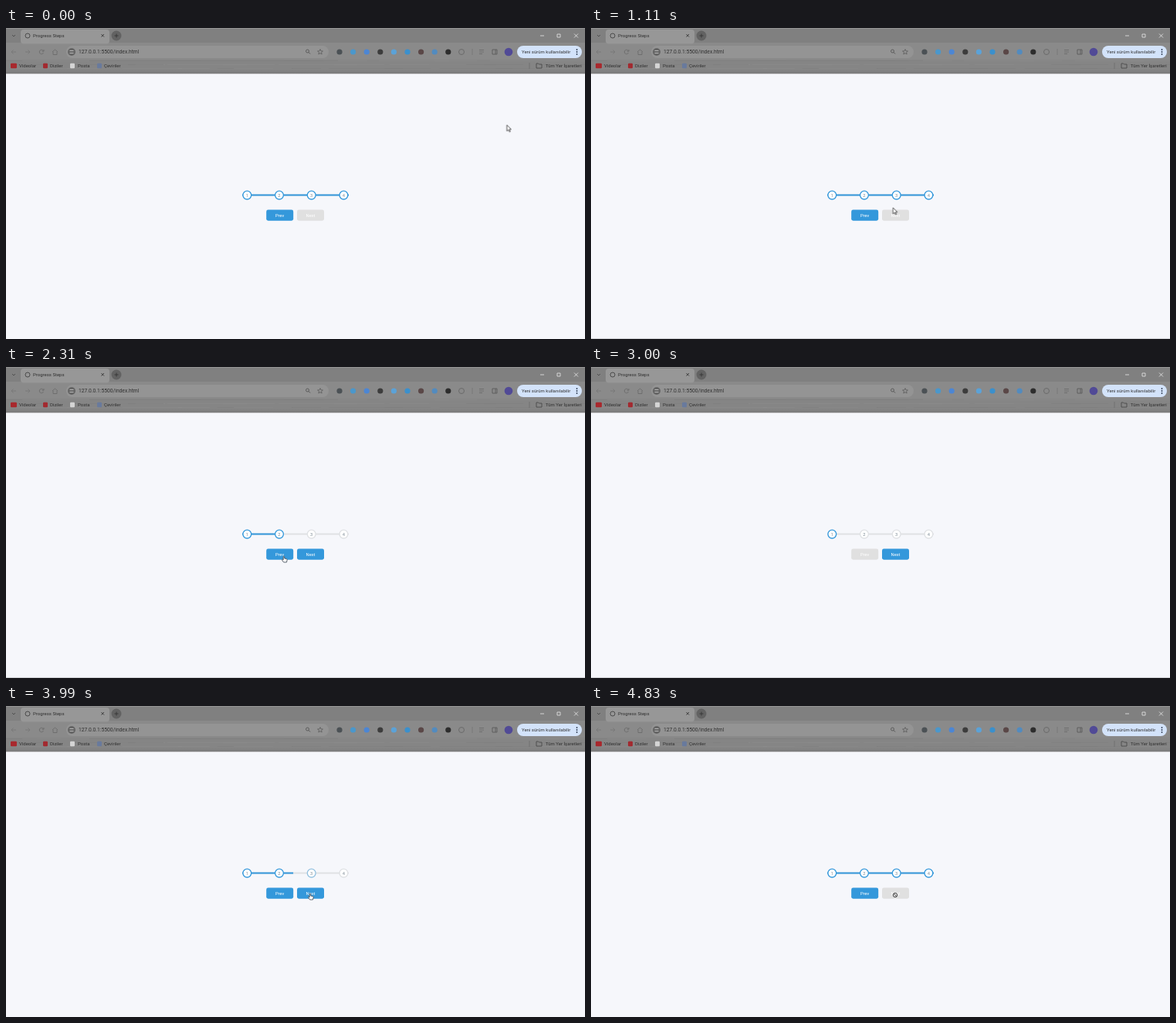
Recreate the animation shown at these times as an HTML page. Size 750 by 403 pixels, loop 4860 ms.

```html
<!DOCTYPE html>
<html lang="tr">
<head>
<meta charset="utf-8">
<title>Progress Steps</title>
<style>
  html, body { margin: 0; width: 100%; height: 100%; overflow: hidden; background: #f6f7fb; }
  svg { display: block; width: 750px; height: 403px; overflow: hidden; }
  #scene { filter: blur(.45px); }
  text { font-family: Roboto, Arial, sans-serif; font-size: 6px; fill: #303030; }
  .url { font-size: 6.7px; }
  .mid { text-anchor: middle; }
  .num { font-size: 5.8px; fill: #7d8a95; }
  .bar { transform-box: fill-box; transform-origin: left; }
  .btn { transform-box: fill-box; transform-origin: center; }
  .btn text { font-size: 5.8px; fill: #fff; }
</style>
</head>
<body>
<svg viewBox="0 0 750 403">
  <defs>
    <linearGradient id="strip" x2="0" y2="1">
      <stop offset="0" stop-color="#858585"/>
      <stop offset=".7" stop-color="#858585"/>
      <stop offset="1" stop-color="#7b7b7b"/>
    </linearGradient>
  </defs>
  <g id="scene"></g>
</svg>
<script>
const LOOP = 4860, EASE = 400;
const BLUE = '#3498db', GREY = '#dfe1e4', OFF = '#e0e0e0';
const scene = document.getElementById('scene');

function add(tag, attrs, parent = scene, content = '') {
  const el = document.createElementNS('http://www.w3.org/2000/svg', tag);
  for (const key in attrs) el.setAttribute(key, attrs[key]);
  el.textContent = content;
  parent.appendChild(el);
  return el;
}
const rect = (x, y, width, height, fill, rx = 0, parent) =>
  add('rect', { x, y, width, height, fill, rx }, parent);
// Full-width bands overshoot the stage so that their ends stay sharp
const band = (y, height, fill) => rect(-5, y, 760, height, fill);
const dot = (cx, cy, r, fill) => add('circle', { cx, cy, r, fill });
const ring = (cx, cy, r, stroke, width = 1) =>
  add('circle', { cx, cy, r, fill: 'none', stroke, 'stroke-width': width });
const line = (d, stroke = '#4a4a4a', width = .9) =>
  add('path', { d, stroke, 'stroke-width': width, fill: 'none' });
const label = (x, y, content, attrs = {}, parent) =>
  add('text', { x, y, ...attrs }, parent, content);

// rows: [time, value, easing to the next row]
function loop(el, prop, rows) {
  const all = [...rows];
  if (all[all.length - 1][0] < LOOP) all.push([LOOP, all[all.length - 1][1]]);
  el.animate(all.map(([t, value, easing = 'linear']) =>
    ({ offset: t / LOOP, [prop]: value, easing })), { duration: LOOP, iterations: Infinity });
}
const hold = (el, prop, rows) => loop(el, prop, rows.map(([t, v]) => [t, v, 'steps(1)']));

// A value that eases to a new state after every click
function eased(el, prop, first, changes) {
  const rows = [[0, first]];
  let last = first;
  for (const [t, value] of changes) {
    rows.push([t, last, 'ease'], [t + EASE, value]);
    last = value;
  }
  loop(el, prop, rows);
}

function drawBrowser() {
  band(-5, 25, '#808080');
  band(0, 1, '#959595');
  band(19, 23, '#8a8a8a');
  band(41, 18.3, 'url(#strip)');
  for (let i = 0; i < 36; i++) {
    const x = (i * 137) % 750, y = 42 + (i * 5) % 15;
    rect(x, y, 40 + (i * 29) % 70, .8, i % 2 ? '#909090' : '#7d7d7d').setAttribute('opacity', .5);
  }

  rect(19, 2, 115, 18.5, '#979797', 4);
  line('M8 9l2 2 2-2');
  ring(28, 10, 3, '#4b4b4b');
  label(35, 12, 'Progress Steps');
  line('M123.5 8l3.5 3.5m0-3.5l-3.5 3.5', '#333');
  dot(143, 10, 6.5, '#626262');
  line('M140.5 10h5m-2.5-2.5v5', '#373737');
  line('M692 10h5M714 8h4v4h-4zM736 7.5l5 5m0-5l-5 5', '#ddd');

  line('M13 31H7m2.5-2.5L7 31l2.5 2.5M25 31h6m-2.5-2.5L31 31l-2.5 2.5', '#777');
  line('M48.5 30a2.7 2.7 0 1 0 0 2M49 28v2.2h-2.2M60 31l3.5-3 3.5 3M61 31v3.5h5V31', '#6b6b6b');
  rect(78, 23, 340, 16, '#949494', 8);
  dot(85, 31, 5, '#656565');
  line('M82.5 29.5h5M82.5 32.5h5', '#c4c4c4');
  label(94, 33.3, '127.0.0.1:5500/index.html', { class: 'url' });
  ring(390.5, 30, 2, '#505050', .8);
  line('M392 31.5l2 2');
  line('M407 27.5l1 2.3 2.5.2-2 1.6.7 2.4-2.2-1.3-2.2 1.3.7-2.4-2-1.6 2.5-.2z', '#555', .7);

  const icons = ['#4b5155', '#4a97cc', '#4c86d4', '#3c3c3c', '#5ba2d8', '#3a90cd',
    '#5a4747', '#528bbf', '#2d2d2d'];
  icons.forEach((fill, i) => dot(432 + i * 17.6, 31, 3.6, fill));
  ring(590, 31, 3.5, '#6a6a6a');
  line('M604 27v8', '#777');
  line('M613 28.5h6M613 31h6M613 33.5h4', '#6b6b6b');
  line('M630 28h6v6h-6zM634 28v6', '#5a5a5a');
  dot(651, 31, 5.3, '#514a96');
  rect(662, 23, 84, 16, '#d3e3fa', 8);
  label(668, 33, 'Yeni sürüm kullanılabilir');
  for (const y of [28, 31, 34]) dot(739.5, y, .9, '#2d3950');

  const marks = [
    [6, 8, 17, '#a8282d', 'Videolar'], [48, 6, 57, '#a22a30', 'Diziler'],
    [83, 6, 93, '#d4d4d4', 'Posta'], [118, 6, 127, '#697a9c', 'Çeviriler']
  ];
  for (const [x, width, textX, fill, name] of marks) {
    rect(x, 45.7, width, 6.5, fill, 1.2);
    label(textX, 51, name);
  }
  line('M678 45v8', '#717171');
  line('M687 46h2.5l1 1H694v5h-7z');
  label(699, 51, 'Tüm Yer İşaretleri');
}

const prevClicks = [1385, 1930, 2550], nextClicks = [3400, 3885, 4400];

function drawSteps() {
  const track = [306, 215.5, 138, 2];
  rect(...track, GREY);
  const bar = rect(...track, BLUE);
  bar.classList.add('bar');
  const scale = n => `scaleX(${n / 3})`;
  eased(bar, 'transform', scale(3), [
    ...prevClicks.map((t, i) => [t, scale(2 - i)]),
    ...nextClicks.map((t, i) => [t, scale(i + 1)])
  ]);

  for (let i = 0; i < 4; i++) {
    const x = 312.3 + i * 41.7;
    const step = ring(x, 216.6, 5.4, BLUE, 1.3);
    step.setAttribute('fill', '#fff');
    label(x, 218.7, i + 1, { class: 'mid num' });
    if (i) eased(step, 'stroke', BLUE, [[prevClicks[3 - i], GREY], [nextClicks[i - 1], BLUE]]);
  }
}

function drawButton(x, text, fills, clicks) {
  const g = add('g', { class: 'btn' });
  const box = rect(x, 235.5, 35, 14.2, BLUE, 2.4, g);
  label(x + 17.5, 244.6, text, { class: 'mid' }, g);
  hold(box, 'fill', fills);
  hold(g, 'transform', [[0, 'none'],
    ...clicks.flatMap(t => [[t - 90, 'scale(.98)'], [t, 'none']])]);
}

function drawCursor() {
  const g = add('g', {});
  const shape = (d, fill, stroke, rows) => {
    const el = add('path', { d, fill, stroke, 'stroke-width': .9, 'stroke-linejoin': 'round' }, g);
    hold(el, 'opacity', rows);
  };
  shape('M0 0V8L2 6.2 3.3 9 4.5 8.5 3.3 5.7H5.6Z', '#fff', '#4a4a4a', [[0, 1], [1180, 0]]);
  shape('M.2.5q.8-1 1.5 0V3l2.7.6q1 .3.7 1.5L4.5 8H.6L-1.5 5q0-1 1-.6l.7.6Z', '#fff', '#4b5560',
    [[0, 0], [1180, 1], [2550, 0], [3030, 1], [4400, 0]]);
  shape('M-1.7 2a2.7 2.7 0 1 0 5.4 0a2.7 2.7 0 1 0-5.4 0M-.9.1L2.9 3.9', '#ddd', '#3c3c3c',
    [[0, 0], [2550, 1], [2850, 0], [4400, 1]]);
  const at = (x, y) => `translate(${x}px, ${y}px)`;
  loop(g, 'transform', [
    [0, at(649, 125.5)], [660, at(504, 190)], [1240, at(359, 245)],
    [2700, at(359, 245), 'ease-in-out'], [2980, at(393, 243)]
  ]);
}

drawBrowser();
drawSteps();
drawButton(337.2, 'Prev', [[0, BLUE], [2550, OFF], [3400, BLUE]], prevClicks);
drawButton(377, 'Next', [[0, OFF], [1385, BLUE], [4400, OFF]], nextClicks);
hold(band(402, 6, '#cfd1d4'), 'opacity', [[0, 0], [600, 1], [3840, 0]]);
drawCursor();
</script>
</body>
</html>
```
